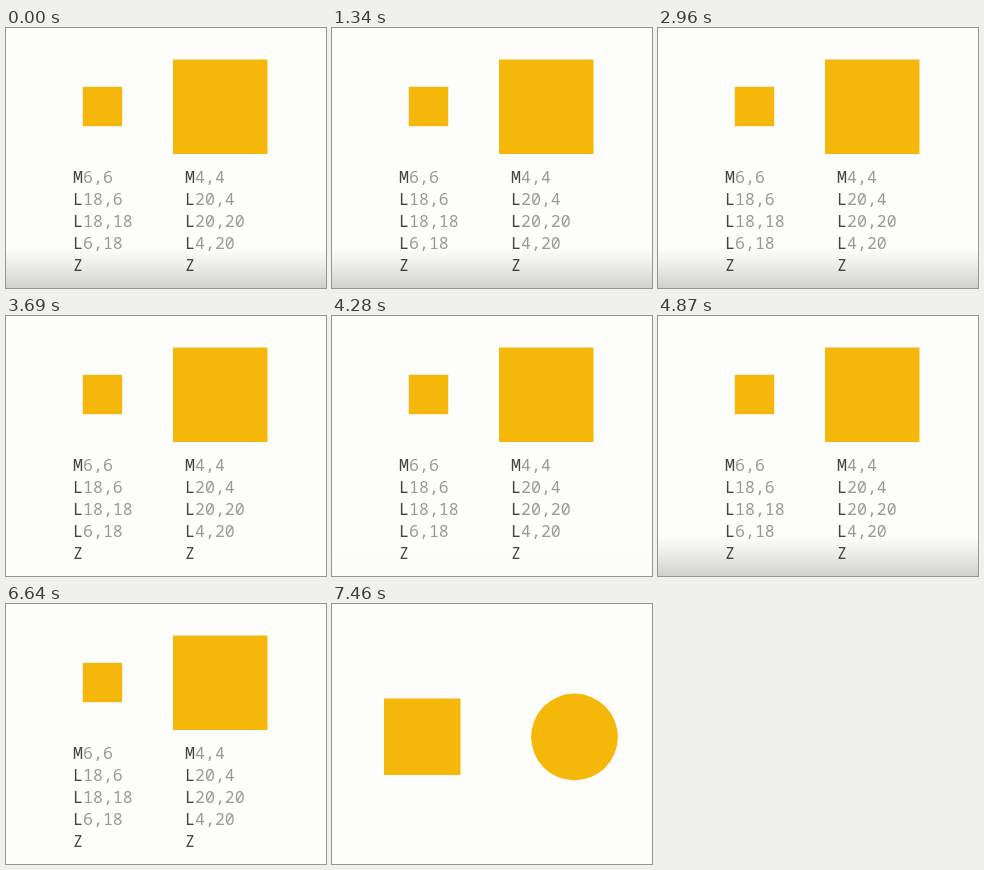
Animation of 320 by 260 pixels, one loop 7560 ms. Source, as an HTML page:

```html
<!DOCTYPE html>
<html lang="en">
<head>
<meta charset="utf-8">
<style>
html, body { margin: 0; width: 100%; height: 100%; overflow: hidden; background: #fdfefc; }
svg { display: block; width: 320px; height: 260px; }
text { font: 300 16.6px "Noto Sans Mono", "DejaVu Sans Mono", monospace; fill: #999; white-space: pre; }
.cmd { font-weight: 500; fill: #444; }
</style>
</head>
<body>
<svg viewBox="0 0 320 260">
  <defs>
    <linearGradient id="shade" x2="0" y2="1">
      <stop offset="0" stop-color="#000" stop-opacity="0"/>
      <stop offset=".4" stop-color="#000" stop-opacity=".06"/>
      <stop offset="1" stop-color="#000" stop-opacity=".18"/>
    </linearGradient>
  </defs>
  <g id="paths" fill="#f5b80a">
    <rect x="76.5" y="58.5" width="40" height="40" fill="#efd9ac"/>
    <rect x="77" y="59" width="39" height="39"/>
    <rect x="167" y="31.5" width="94.5" height="94.5"/>
    <rect id="bar" y="220" width="320" height="40" fill="url(#shade)"/>
  </g>
  <g id="shapes" fill="#f5b80a">
    <rect x="52" y="94.5" width="76.5" height="76.5"/>
    <circle cx="242.5" cy="133" r="43.4"/>
  </g>
</svg>
<script>
const LOOP = 7560, CUT = 7460, FADE = 290;
const [paths, shapes, bar] = ["paths", "shapes", "bar"].map(id => document.getElementById(id));

function make(tag, parent, attrs, content = "") {
  const el = document.createElementNS("http://www.w3.org/2000/svg", tag);
  for (const key in attrs) el.setAttribute(key, attrs[key]);
  el.textContent = content;
  return parent.appendChild(el);
}

function listCommands(x, commands) {
  commands.split(" ").forEach((command, row) => {
    const line = make("text", paths, { x, y: 155 + 22 * row });
    make("tspan", line, { class: "cmd" }, command[0]);
    make("tspan", line, {}, command.slice(1));
  });
}
listCommands(67, "M6,6 L18,6 L18,18 L6,18 Z");
listCommands(179, "M4,4 L20,4 L20,20 L4,20 Z");
paths.append(bar);

const ramp = (t, start) => Math.min(1, Math.max(0, (t - start) / FADE));

function draw() {
  const t = performance.now() % LOOP;
  const cut = t >= CUT;
  paths.style.display = cut ? "none" : "";
  shapes.style.display = cut ? "" : "none";
  // The shade leaves, returns and leaves again.
  bar.setAttribute("opacity", 1 - ramp(t, 3250) + ramp(t, 4270) - ramp(t, 5600));
  requestAnimationFrame(draw);
}
draw();
</script>
</body>
</html>
```
